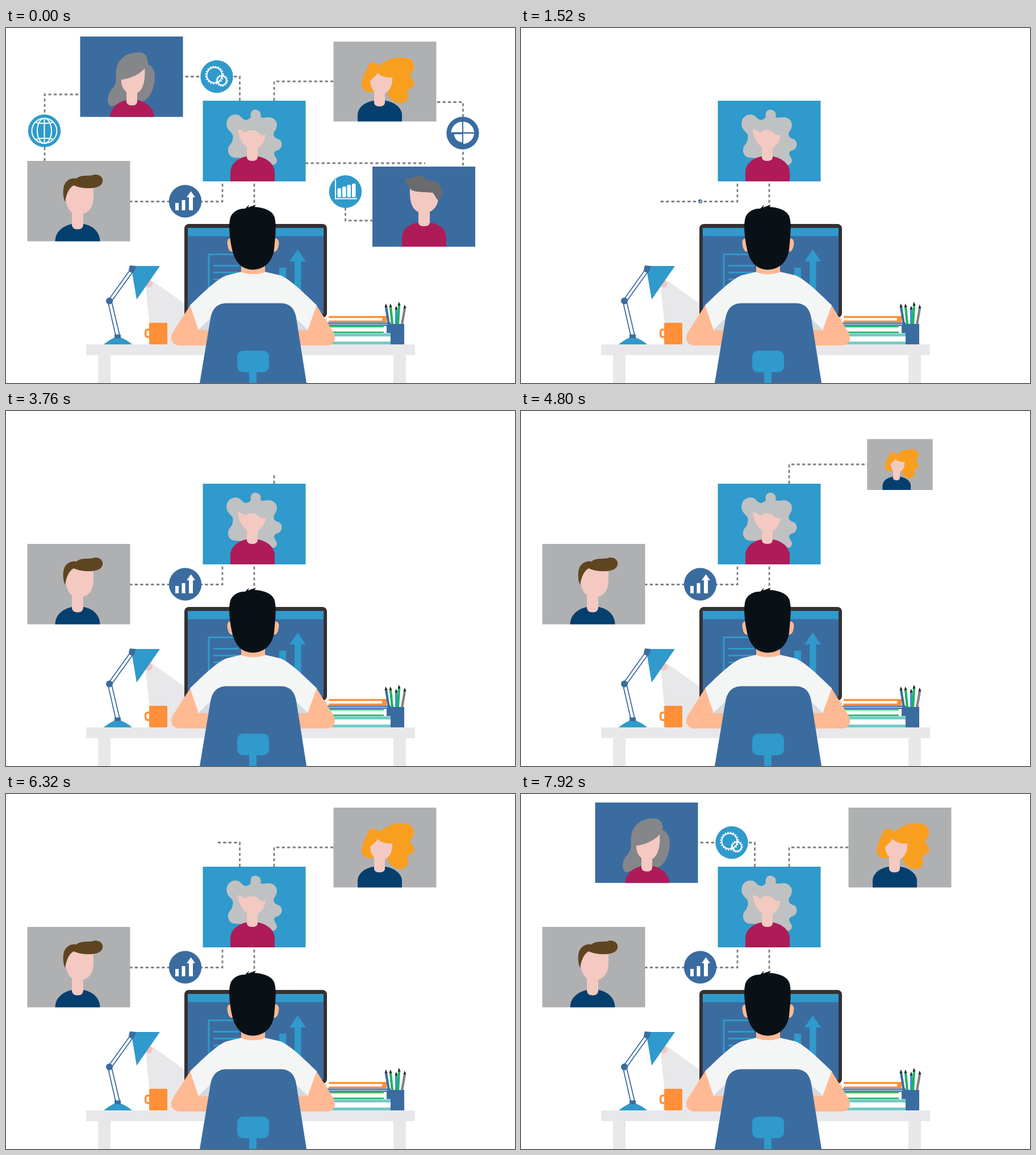
These frames come from a looping animation (896x625 px, 8000 ms). An HTML page:

```html
<!DOCTYPE html>
<html lang="en">
<head>
<meta charset="utf-8">
<title>Video meeting</title>
<style>
  html, body { margin: 0; width: 100%; height: 100%; overflow: hidden; background: #fff; }
  svg { display: block; width: 100vw; height: 100vh; }
  .wire { fill: none; stroke: #808184; stroke-width: 2.8; stroke-dasharray: 5.3 4.2; }
  .sky { fill: #2f9acb; }
  .blue { fill: #3b6ca0; }
  .gray { fill: #afb0b2; }
  .navy { fill: #053f6e; }
  .wine { fill: #ae1b58; }
  .face { fill: #f3c9c2; }
  .skin { fill: #ffb993; }
  .pale { fill: #e8e8ea; }
  .white { fill: #fff; }
  .ink { fill: none; stroke: #fff; stroke-width: 2; }
  .glow { fill: none; stroke: #2f9acb; stroke-width: 3; }
</style>
</head>
<body>
<svg viewBox="0 0 896 625">
  <g id="wires"></g>

  <g id="panels">
    <g id="extras">
      <g id="panel4">
        <rect class="blue" x="645" y="244" width="181" height="141"/>
        <path class="wine" d="M697 385V370C697 353 711 345 724 343H748C762 345 775 354 775 370V385Z"/>
        <path class="face" d="M726 315H746V343Q745 349 736 349Q727 349 726 343Z"/>
        <path class="face" d="M711 281C710 310 716 325 736 326C752 325 761 312 761 299L752 285Z"/>
        <path fill="#6a6b6d" d="M703 263C712 267 716 262 724 261C736 260 741 265 740 268C753 265 769 275 767 289C769 296 765 302 760 303C756 298 754 292 751 290C735 288 712 291 709 279C702 274 705 268 703 263Z"/>
      </g>
      <g id="globe">
        <circle class="sky" cx="67.5" cy="181" r="28.7"/>
        <g class="ink">
          <circle cx="67.5" cy="181" r="22"/>
          <ellipse cx="67.5" cy="181" rx="12.5" ry="22"/>
          <path d="M67.5 159V203M51.5 166Q67.5 170 83.500 166M51.5 196Q67.5 192 83.5 196"/>
        </g>
      </g>
      <g id="pie">
        <circle class="blue" cx="804" cy="185" r="28.7"/>
        <path class="white" d="M803 183.500H783.5A20 20 0 0 1 803 165ZM805 165A20 20 0 0 1 824 183.500H805ZM824 186A20 20 0 0 1 805 204V186ZM803 187V201A14 14 0 0 1 789 187Z"/>
      </g>
      <g id="chart">
        <circle class="sky" cx="597.5" cy="288" r="28.7"/>
        <path class="ink" d="M580 267V300.5H618"/>
        <g class="white">
          <rect x="583.5" y="282" width="6.5" height="16" rx="2"/>
          <rect x="592" y="279" width="6.5" height="19" rx="2"/>
          <rect x="600.5" y="276" width="6.5" height="22" rx="2"/>
          <rect x="609" y="274" width="6.5" height="24" rx="2"/>
        </g>
      </g>
    </g>

    <g id="panel1">
      <rect class="gray" x="37.5" y="234" width="181" height="141.5"/>
      <path class="navy" d="M86.5 375.5C87 357 102 348 116 345H137C152 348 165 358 165.5 375.5Z"/>
      <path class="face" d="M116 315H136V347Q135 354.5 126 354.5Q117 354.5 116 347Z"/>
      <path class="face" d="M105 296C105 317 114 328 129 328C146 327 154 316 154 296V276H112Z"/>
      <path fill="#5e4520" d="M104 306C100 298 100 285 102 278C106 266 118 263 124 265C132 257 150 262 155 258C172 257 174 272 165 278C152 285 130 282 119 277C109 283 106 295 104 306Z"/>
    </g>
    <g id="panel2">
      <rect class="gray" x="576.5" y="24" width="181" height="140.5"/>
      <path fill="#f99f20" d="M642 113C629 113 623 104 627 92C630 80 636 72 639 63C648 59 655 62 658 67C668 55 690 48 710 54C720 59 721 72 713 80C708 84 719 92 719 98C718 106 709 107 705 110C711 118 708 130 697 132C683 132 672 124 671 110Z"/>
      <path class="navy" d="M619 164.5V152C620 138 634 130 647 128H668C682 130 696 139 697 152V164.5Z"/>
      <path class="face" d="M648 106H667V132Q666 138 657.5 138Q649 138 648 132ZM641 93C646 88 652 84 654 79C660 86 672 88 680 87C681 105 672 117 658 117C648 115 642 106 641 93Z"/>
    </g>
    <g id="panel3">
      <rect class="blue" x="130.5" y="15" width="181" height="141.5"/>
      <path fill="#85868a" d="M183 137C176 130 179 115 187 107C197 96 192 85 194 75C196 55 212 43 232 43C245 42 250 50 250 64C260 68 264 80 261 97C258 115 250 125 240 130L195 135C190 137 186 138 183 137Z"/>
      <path class="wine" d="M183 156.5C184 141 197 130 212 127H232C247 130 260 140 261 156.5Z"/>
      <path class="face" d="M212 106H231V130Q230 136.5 222 136.5Q213 136.5 212 130ZM203 91C215 90 236 82 244 71C246 95 240 115 224 117C210 116 202 103 203 91Z"/>
    </g>
    <g id="panel0">
      <rect class="sky" x="346.5" y="128" width="181" height="142"/>
      <path fill="#c0c1c2" d="M400 228C391 225 388 214 394 206C400 200 400 191 399 188C397 182 385 178 389 163C394 150 409 150 414 157C419 163 425 164 431 157C429 147 435 143 440 144C447 145 450 150 448 157C455 160 460 155 468 158C478 162 479 173 474 180C468 188 472 194 481 196C489 202 486 214 476 216C468 220 474 225 477 232C477 242 468 243 462 238L413 229Z"/>
      <path class="wine" d="M395 270V253C396 237 411 228 424 226H444C458 229 472 238 473 253V270Z"/>
      <path class="face" d="M424 203H443V228Q442 234 433.5 234Q425 234 424 228ZM408 178C412 178 418 182 421 184C428 178 440 178 446 186C450 190 454 188 457 188C455 205 444 213 434 213C420 212 410 197 408 178Z"/>
    </g>

    <g id="trend">
      <circle class="blue" cx="315.5" cy="305" r="28.7"/>
      <path class="white" d="M298 308H304V321H298ZM309.5 303H315.5V321H309.5ZM322 321V298H318L325.5 287.5L333 298H329V321Z"/>
    </g>
    <g id="gears">
      <circle class="sky" cx="371" cy="85.5" r="28.7"/>
      <g class="ink">
        <circle cx="367" cy="83" r="13.5"/>
        <circle cx="367" cy="83" r="15.5" stroke-dasharray="2.7 2.2"/>
        <circle cx="380" cy="92.5" r="8"/>
        <circle cx="380" cy="92.5" r="9.7" stroke-dasharray="2.2 1.8"/>
      </g>
    </g>
  </g>

  <g id="desk">
    <path class="pale" d="M141 557H720V576H704V625H682V576H184V625H162V576H141ZM246 456L258 445L318 488V557H256Z"/>
    <circle cx="251" cy="450" r="7" fill="#f3c5c0"/>
    <path class="sky" d="M220 419H271L230 478ZM172 557Q182 549 191 545H202Q213 549 222 557Z"/>
    <path fill="none" stroke="#3b6ca0" stroke-width="1.8" d="M219 425L181 478M224 428L186 481M180 484L193 541M186 482L200 541"/>
    <path class="blue" d="M218 418L229 419L225 430Q218 432 216 426ZM191 539.5H202V546H191Z"/>
    <circle class="blue" cx="182" cy="480.5" r="6"/>
    <rect x="252" y="519" width="32" height="38" rx="2" fill="#ff8f38"/>
    <path fill="none" stroke="#ff8f38" stroke-width="3.6" d="M253 531H249Q245.5 531 245.5 537.5Q245.5 544 249 544H253"/>
  </g>

  <g id="monitor">
    <rect x="314" y="345" width="251" height="165" rx="8" fill="#333133"/>
    <rect class="blue" x="320" y="352" width="239" height="151"/>
    <rect class="sky" x="320" y="352" width="239" height="14.5"/>
    <path class="glow" d="M420 398.5H357V470M365 418.5H410M365 430.5H410M365 442.5H408M365 454H385"/>
    <path class="sky" d="M466 432H470V470H466ZM481 422H493V470H481ZM508 470V411H499L513.5 390L528 411H519.5V470Z"/>
  </g>

  <g id="books">
    <rect x="551" y="511" width="14" height="11" fill="#f9d3bb"/>
    <path fill="#ff8f38" d="M568 507H670V518H568V515H662V510.5H568Z"/>
    <path class="blue" d="M564 518.5H677V537H670V524.5H564Z"/>
    <path class="white" d="M566 521H672V522H566Z"/>
    <path fill="#22b35e" d="M570 525H665V527H570ZM570 534.5H665V537H570Z"/>
    <path fill="#72cbc7" d="M572 537.5H677V543H572ZM572 552H677V557H572Z"/>
    <g id="pencils"></g>
    <rect class="blue" x="677" y="521" width="24" height="36"/>
  </g>

  <g id="man">
    <path class="skin" d="M325 487L296 532C286 546 292 559 306 559H564C578 559 584 546 574 532L546 487Z"/>
    <path fill="#f4f5f5" d="M324 488C346 467 371 442 388 435.500L415 429H455L483 435.500C500 442 525 467 547 488L531 532H339Z"/>
    <path fill="#d5dade" d="M338 532L360 511V532ZM532 532L510 511V532Z"/>
    <path class="skin" d="M414 412H456V430Q435 437 414 430ZM400 372C392 367 388 374 390 382C391 391 396 396 400 393ZM469 372C477 367 482 374 480 382C479 391 474 396 470 393Z"/>
    <path fill="#091117" d="M398 390C392 362 391 336 398 328C405 319 414 318 421 318L428 311L426 316L440 311L437 315C455 316 470 322 473 334C477 350 473 375 472 390C469 410 457 425 434 425.5C412 425 402 408 398 390Z"/>
    <path class="blue" d="M341 625L360 511C363 493 373 484.5 389 484.5H483C499 484.5 508 493 511 511L529 625Z"/>
    <path class="sky" d="M419 568H451Q463 568 463 580V594Q463 606 451 606H441V625H428V606H419Q407 606 407 594V580Q407 568 419 568Z"/>
  </g>
</svg>
<script>
const LOOP = 8000, STEP = 80, RISE = 370, SETTLE = 270;
const $ = id => document.getElementById(id);
const add = (parent, tag, attrs) => {
  const el = document.createElementNS('http://www.w3.org/2000/svg', tag);
  for (const k in attrs) el.setAttribute(k, attrs[k]);
  return parent.appendChild(el);
};
const wire = pts => add($('wires'), 'polyline', { class: 'wire', points: pts.join(' ') });

// pencils: top x, top y, foot x, colour
[[669, 486, 674, '#3b6ca0'], [677, 486, 680, '#22b35e'], [687, 490, 687, '#2f9acb'],
 [692, 483, 690, '#22b35e'], [702, 488, 697, '#808184']].forEach(([x, y, foot, color]) => {
  add($('pencils'), 'path', { d: `M${x} ${y + 5}L${foot} 522`, stroke: color, 'stroke-width': 4.2 });
  add($('pencils'), 'path', { d: `M${x - 2.5} ${y + 6}L${x - .5} ${y - 1}L${x + 2.5} ${y + 5}Z`, fill: '#222' });
});

wire([[437, 274], [437, 318]]);
const extraWires = [
  [[68, 234], [68, 117], [131, 117]],
  [[759, 130.5], [804.5, 130.5], [804.5, 244]],
  [[527, 238], [738, 238]],
  [[597.5, 316], [597.5, 339], [646, 339]]
].map(wire);

// growing wires: points, start, end
const grown = [
  [[[381, 274], [381, 305.5], [175, 305.5]], 975, 1750],
  [[[472, 128], [472, 94], [661, 94]], 3706, 4420],
  [[[411.5, 128], [411.5, 85.5], [234, 85.5]], 6048, 6752]
].map(([pts, from, to]) => ({ el: wire(pts), pts, from, to }));

// pops: id, centre, start, peak scale
const pops = [
  ['trend', 315.5, 305, 1480, 1.16],
  ['panel1', 128, 304.7, 2355, 1.25],
  ['panel2', 667, 94.2, 4600, 1.18],
  ['gears', 371, 85.5, 6400, 1.16],
  ['panel3', 221, 85.7, 7150, 1.185]
];

function partial([a, b, c], k) {
  const first = Math.abs(b[1] - a[1]), second = Math.abs(c[0] - b[0]);
  const len = k * (first + second);
  const mix = (p, q, f) => [p[0] + (q[0] - p[0]) * f, p[1] + (q[1] - p[1]) * f];
  return len < first ? [a, mix(a, b, len / first)] : [a, b, mix(b, c, (len - first) / second)];
}

function popScale(dt, peak) {
  if (dt <= 0) return 0;
  if (dt < RISE) return peak * dt / RISE;
  return Math.max(1, peak - (peak - 1) * (dt - RISE) / SETTLE);
}

const show = (el, on) => el.setAttribute('visibility', on ? 'visible' : 'hidden');

function draw(now) {
  const t = Math.floor((now % LOOP) / STEP) * STEP;
  const full = t < STEP;
  [$('extras'), ...extraWires].forEach(el => show(el, full));
  grown.forEach(({ el, pts, from, to }) => {
    const k = full ? 1 : Math.min(1, (t - from) / (to - from));
    show(el, k > 0);
    if (k > 0) el.setAttribute('points', partial(pts, k).join(' '));
  });
  pops.forEach(([id, x, y, start, peak]) => {
    const s = full ? 1 : popScale(t - start, peak);
    show($(id), s > 0);
    $(id).setAttribute('transform', `translate(${x} ${y}) scale(${s}) translate(${-x} ${-y})`);
  });
}

const begin = performance.now();
function tick() {
  draw(performance.now() - begin);
  requestAnimationFrame(tick);
}
tick();
</script>
</body>
</html>
```
